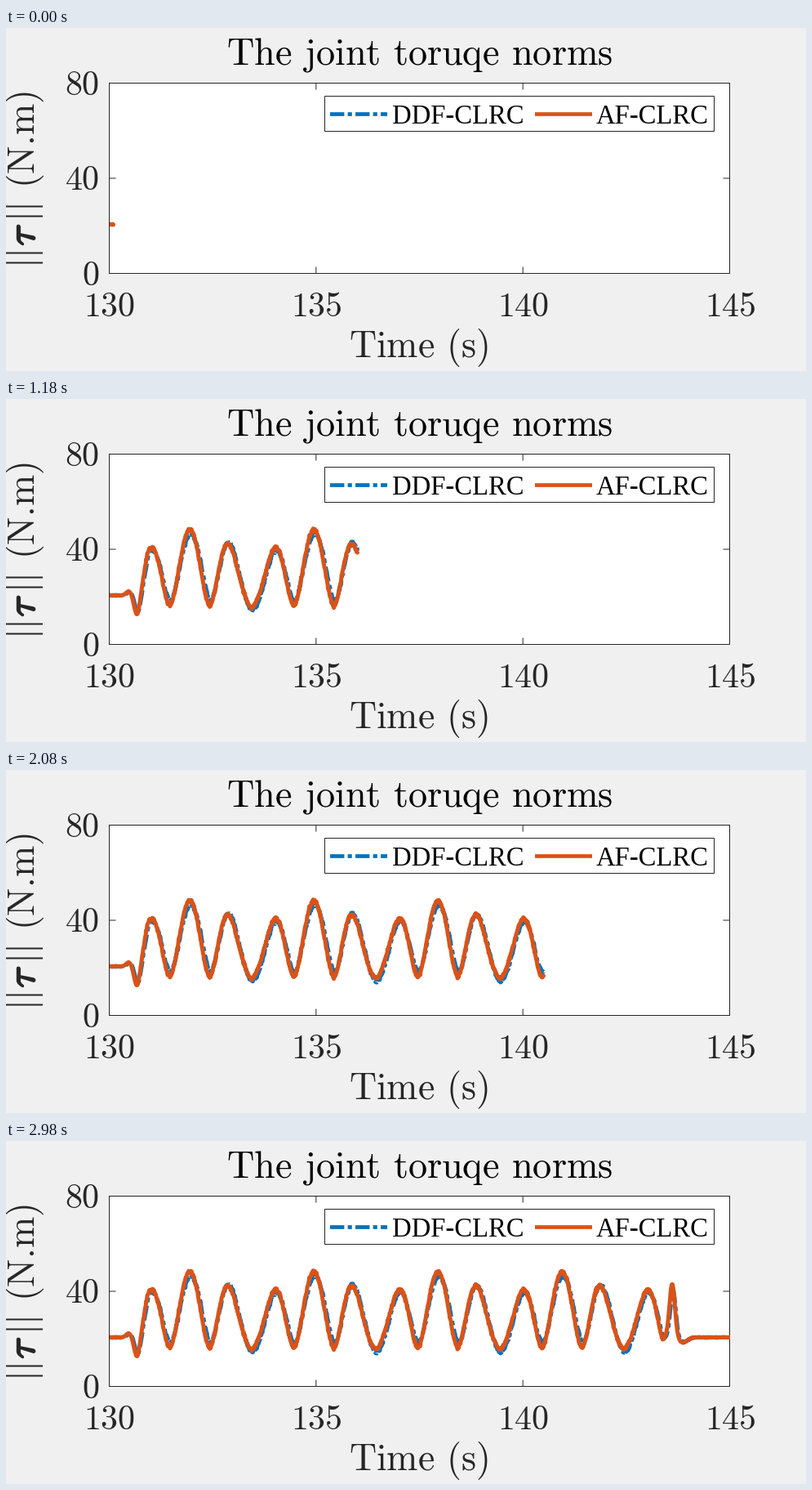
A matplotlib script for the animation above (3 s loop, 980 px wide and 420 px high).

```python
import numpy as np
import matplotlib.pyplot as plt
from matplotlib import patheffects
from matplotlib.animation import FuncAnimation
from matplotlib.patches import Rectangle

plt.rcParams["mathtext.fontset"] = "cm"

W, H, DPI = 980, 420, 100
PT = 72 / DPI                       # points per pixel
FRAMES, INTERVAL = 150, 20
STEPS = 10                          # samples drawn per frame
T0, T1, V_MAX = 130, 145, 80
LEFT, TOP, PLOT_W, PLOT_H = 126.5, 67.5, 760, 233
RIGHT, BOTTOM = LEFT + PLOT_W, TOP + PLOT_H
INK, BLUE, ORANGE = "#262626", "#0072BD", "#D95319"
DASH_DOT = (0, (3.7, 0.9, 1.1, 0.9))

fig = plt.figure(figsize=(W / DPI, H / DPI), dpi=DPI, facecolor="#f0f0f0")
ax = fig.add_axes([0, 0, 1, 1])
ax.set_xlim(0, W)
ax.set_ylim(H, 0)
ax.axis("off")


def px_x(t):
    return LEFT + (t - T0) / (T1 - T0) * PLOT_W


def px_y(v):
    return BOTTOM - v / V_MAX * PLOT_H


def tex(s):
    """Upright Computer Modern with text-mode spacing."""
    s = s.replace(".", r".\hspace{-0.2}").replace(" ", r"\hspace{0.38}")
    return rf"$\mathrm{{{s}}}$"


def label(x, y, s, px, ha="center", color=INK, **kw):
    ax.text(x, y, s, fontsize=px * PT, ha=ha, va="baseline", color=color, **kw)


def rule(x0, y0, x1, y1, px=1, color=INK, **kw):
    ax.plot([x0, x1], [y0, y1], color=color, lw=px * PT, snap=False,
            solid_capstyle="butt", dash_capstyle="butt", **kw)


def box(x, y, w, h, z):
    patch = Rectangle((x, y), w, h, fc="white", ec=INK, lw=PT, zorder=z,
                      snap=False)
    return ax.add_patch(patch)


def draw_axes():
    for t in range(T0, T1 + 1, 5):
        x = px_x(t)
        label(x + 0.5, 353, tex(str(t)), 42)
        rule(x, BOTTOM, x, BOTTOM - 8)
        rule(x, TOP, x, TOP + 8)
    for v in range(0, V_MAX + 1, 40):
        y = px_y(v)
        label(114.5, y + 14.5, tex(str(v)), 42, ha="right")
        rule(LEFT, y, LEFT + 8, y)
        rule(RIGHT, y, RIGHT - 8, y)
    label(506.5, 45, tex("The joint toruqe norms"), 46.25, color="black")
    label(505.5, 403, tex("Time (s)"), 46)
    return box(LEFT, TOP, PLOT_W, PLOT_H, 1)


def draw_ylabel():
    for y in (287.5, 230.5):
        rule(0, y, 45, y, 2)
        rule(0, y - 12, 45, y - 12, 2)
    turn = dict(rotation=90, rotation_mode="anchor")
    bold = [patheffects.withStroke(linewidth=2.2 * PT, foreground=INK)]
    label(35, 253, r"$\tau$", 48, path_effects=bold, **turn)
    label(35, 196.5, tex("(N.m)"), 46, ha="left", **turn)


def draw_legend():
    box(390.5, 83.5, 477, 43, 5)
    rule(397, 105.5, 467, 105.5, 4.7, BLUE, ls=DASH_DOT, zorder=6)
    rule(648, 105.5, 718, 105.5, 4.7, ORANGE, zorder=6)
    for x, s in ((472.5, "DDF-CLRC"), (722.5, "AF-CLRC")):
        label(x, 117, s, 32.7, ha="left", color="black",
              family="Liberation Serif", zorder=6)


def ramp(t, a, b):
    u = np.clip((t - a) / (b - a), 0, 1)
    return u * u * (3 - 2 * u)


def pulse(t, height, centre, width):
    return height * np.exp(-((t - centre) / width) ** 2 / 2)


def swing(t, floor, peak):
    """Three beats per 3 s turn between a floor and a peak that vary with it."""
    phi = 2 * np.pi * (t - 131.945) / 3
    c, s = np.cos(phi), np.sin(phi)
    beat = 3 * phi + 0.30 * s - 0.165 * np.sin(2 * phi)
    lo = floor[0] + floor[1] * c
    hi = peak[0] + peak[1] * c + peak[2] * s
    return lo + (hi - lo) * ((1 + np.cos(beat)) / 2) ** 0.88


def torque(t, floor, peak, gain, lag, rng):
    """Rest, start-up dip, steady swing, stopping kick, rest."""
    noise = rng.normal(0, 1, len(t))
    t = t - lag
    rest = 20.6 + gain * (pulse(t, 1.8, 130.48, 0.07)
                          - pulse(t, 8.0, 130.67, 0.07)
                          + pulse(t, 22.5, 143.61, 0.065)
                          - pulse(t, 2.2, 143.87, 0.10))
    on = ramp(t, 130.66, 130.95) * (1 - ramp(t, 143.3, 143.46))
    return rest + on * (swing(t, floor, peak) - rest) + noise * (0.06 + 0.3 * on)


rng = np.random.default_rng(4)
ts = np.linspace(T0, T1, FRAMES * STEPS + 1)
xs = px_x(ts)
blue_y = px_y(torque(ts, (16.9, 2.6), (42.6, 3.9, 1.6), 0.88, 0.02, rng))
orange_y = px_y(torque(ts, (16.1, 0.4), (43.3, 4.9, 0.9), 1, 0, rng))

frame = draw_axes()
draw_ylabel()
draw_legend()


def trace(color, z, **kw):
    line, = ax.plot([], [], color=color, lw=5 * PT, zorder=z,
                    solid_joinstyle="round", dash_joinstyle="round", **kw)
    line.set_clip_path(frame)
    return line


blue = trace(BLUE, 3, ls=DASH_DOT, dash_capstyle="butt")
orange = trace(ORANGE, 4, solid_capstyle="round")


def update(n):
    end = (n + 1) * STEPS + 1
    blue.set_data(xs[:end], blue_y[:end])
    orange.set_data(xs[:end], orange_y[:end])
    return blue, orange


anim = FuncAnimation(fig, update, frames=FRAMES, interval=INTERVAL,
                     repeat=True, repeat_delay=0)
plt.show()
```
